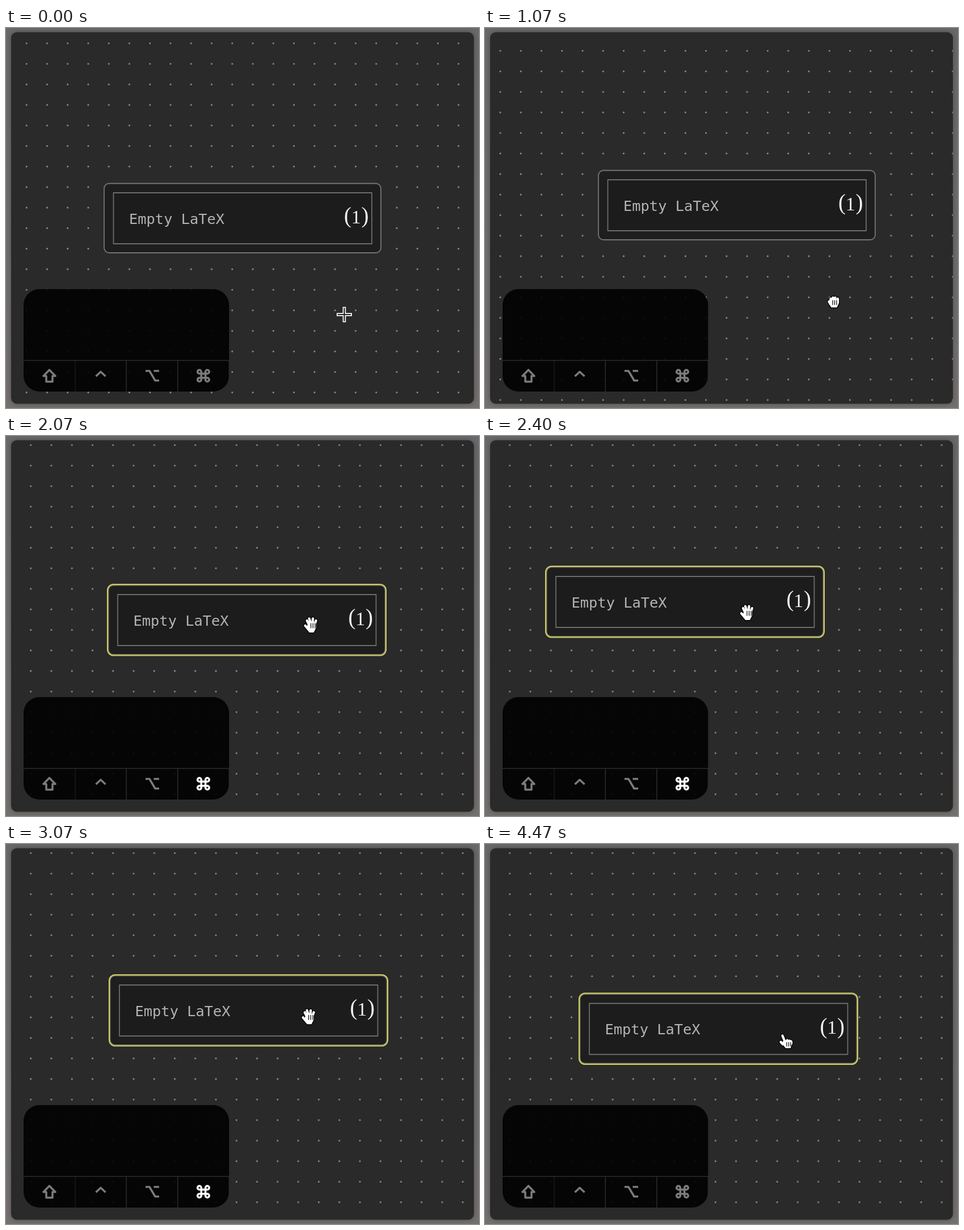
Write an HTML page with a canvas that moves like this. It is 834 px wide and 671 px high and loops after 4.54 s.

```html
<!DOCTYPE html>
<html lang="en">
<head>
<meta charset="utf-8">
<title>Canvas pan and drag</title>
<style>
  html, body { margin: 0; width: 100%; height: 100%; overflow: hidden; background: #6c6b6d; }
  canvas { display: block; }
</style>
</head>
<body>
<canvas id="stage" width="834" height="671"></canvas>
<script>
const ctx = document.getElementById('stage').getContext('2d');
const LOOP = 4540, TICK = 1000 / 15, GRID = 36.27;
const PAN_START = 1, PAN_END = 24, DRAG_START = 31, RELEASE = 53;

// Offsets per tick: circling the view, then circling the node.
const panPath = [
  [0, 0], [4, 6], [31, 3], [42, -22], [10, -48], [-28, -40], [-40, -8], [-6, 8],
  [33, -9], [68, -22], [20, -54], [-30, -46], [-46, -14], [-18, 10], [18, 2], [27, -23],
  [-8, -26], [-34, -36], [-42, -8], [-8, 10], [27, 0], [27, -18], [8, -16], [7.5, -11]
];
const dragPath = [
  [0, 0], [2, 3], [38, 4], [20, -38], [-30, -53], [-72, -32], [-82, 5], [-45, 38],
  [8, 40], [41, -2], [-27, -43.5], [-73, -38], [-68, 28], [-15, 55], [35, 28], [3, -31],
  [-18, -20], [-18, 4], [-14, 5], [-13, 1.5]
];

const clamp = (v, lo, hi) => Math.min(hi, Math.max(lo, v));
const mix = (a, b, f) => [a[0] + (b[0] - a[0]) * f, a[1] + (b[1] - a[1]) * f];
const add = (a, b) => [a[0] + b[0], a[1] + b[1]];

function along(path, step) {
  const s = clamp(step, 0, path.length - 1), i = Math.floor(s);
  return mix(path[i], path[Math.min(i + 1, path.length - 1)], s - i);
}

const icons = {
  shift: 'M76.5 603.7L87 614.5H82V624.5H71V614.5H66Z',
  control: 'M158.5 615L167 607L175.5 615',
  option: 'M246 605.5H253L263 622.5H270M260.5 605.5H270',
  command: 'M344.3 607a3.3 3.3 0 1 0 -3.3 3.3H355a3.3 3.3 0 1 0 -3.3 -3.3V621' +
    'a3.3 3.3 0 1 0 3.3 -3.3H341a3.3 3.3 0 1 0 3.3 3.3Z'
};

const hands = {
  open: {
    limbs: 'M-3 0L-7 -8M0 -2L-3 -11.5M3 -2L3.5 -11.5M6 0L9 -8M-4 8L-10 1',
    palm: 'M-6 -1H9V5L5 13H-3L-8 6Z',
    marks: 'M0 -3V5M3.7 -3V5M7.4 -3V5'
  },
  fist: {
    limbs: 'M-5 -5V2M-1 -7V2M3 -7V2M7.5 -5V2M-8 0L-5 5',
    palm: 'M-7 -3H9V4L6 10.5H-4L-8 4Z',
    marks: 'M-1.5 -2V5.5M2 -2V5.5M5.5 -2V5.5'
  },
  point: {
    limbs: 'M.5 4L5 15M9 12V17M13 13V17M16 14.5V18M-2.5 15L1 19',
    palm: 'M3 12H17V19L15 26H6L-1 17Z',
    marks: 'M8 16V22.5M11.5 16V22.5M15 16V22.5'
  }
};

function strokePath(d, color, width) {
  ctx.strokeStyle = color;
  ctx.lineWidth = width;
  ctx.stroke(new Path2D(d));
}

function roundBox(x, y, w, h, r, fill, stroke, width = 1.8) {
  ctx.beginPath();
  ctx.roundRect(x, y, w, h, r);
  if (fill) { ctx.fillStyle = fill; ctx.fill(); }
  if (stroke) { ctx.strokeStyle = stroke; ctx.lineWidth = width; ctx.stroke(); }
}

function label(text, x, y, font, color) {
  ctx.font = font;
  ctx.fillStyle = color;
  ctx.fillText(text, x, y);
}

function drawBackdrop() {
  const g = ctx.createLinearGradient(0, 0, 0, 671);
  g.addColorStop(0, '#69686b');
  g.addColorStop(1, '#73706e');
  ctx.fillStyle = g;
  ctx.fillRect(0, 0, 834, 671);
  ctx.save();
  ctx.shadowColor = 'rgba(0,0,0,.3)';
  ctx.shadowBlur = 8;
  roundBox(9, 7.5, 816, 656, 10, '#2a2a2a');
  ctx.restore();
}

function drawDots([dx, dy]) {
  const first = v => ((v % GRID) + GRID) % GRID;
  ctx.save();
  ctx.beginPath();
  ctx.roundRect(9, 7.5, 816, 656, 10);
  ctx.clip();
  ctx.fillStyle = '#868686';
  ctx.beginPath();
  for (let x = first(36.2 + dx); x < 830; x += GRID) {
    for (let y = first(27 + dy); y < 670; y += GRID) {
      ctx.moveTo(x + 1.6, y);
      ctx.arc(x, y, 1.6, 0, Math.PI * 2);
    }
  }
  ctx.fill();
  ctx.restore();
}

function drawNode([dx, dy], selected) {
  ctx.save();
  ctx.translate(dx, dy);
  roundBox(173, 274.5, 488, 122.5, 9, '#1e1e1e', '#747474');
  if (selected) roundBox(171.5, 273, 491, 125.5, 10.5, null, '#d2cf60', 2.1);
  roundBox(189.5, 291, 455.5, 90, 0, '#1c1c1c', '#6c6c6c');
  label('Empty LaTeX', 217, 345.5, '25.4px "DejaVu Sans Mono", monospace', '#b4b4b4');
  const serif = 'px "Liberation Serif", serif', ink = '#f2f2f2';
  label('(', 596, 344.4, 39 + serif, ink);
  label('1', 608.7, 344.5, 34 + serif, ink);
  label(')', 626.5, 344.4, 39 + serif, ink);
  ctx.restore();
}

function drawKeys(commandDown) {
  ctx.save();
  ctx.beginPath();
  ctx.roundRect(31, 461, 362.3, 181, 28);
  ctx.clip();
  ctx.fillStyle = 'rgba(0,0,0,.89)';
  ctx.fillRect(31, 461, 363, 125.2);
  for (let i = 0; i < 4; i++) ctx.fillRect(31 + i * 90.6 + (i ? .8 : 0), 587.8, i ? 89.1 : 90.6, 55);
  ctx.restore();
  ctx.lineCap = 'butt';
  for (const name in icons) {
    strokePath(icons[name], name === 'command' && commandDown ? '#fff' : '#7c7c7c', 3.5);
  }
}

function drawCross() {
  const arms = 'M0 -13.5V13.5M-13.5 0H13.5', core = 'M0 -11.7V11.7M-11.7 0H11.7';
  ctx.lineCap = 'butt';
  strokePath(arms, '#fff', 5.6);
  strokePath(core, '#222', 2.2);
}

function drawHand({ limbs, palm, marks }) {
  ctx.lineCap = 'round';
  strokePath(limbs, '#000', 6.6);
  strokePath(palm, '#000', 3);
  strokePath(limbs, '#fff', 4.3);
  ctx.fillStyle = '#fff';
  ctx.fill(new Path2D(palm));
  strokePath(marks, '#111', 1.3);
}

// The pointer runs slightly ahead of whatever it moves.
function pointerAt(tick) {
  const lead = .3, rest = [591, 494], hover = [537, 333];
  if (tick < PAN_START) return [596.5, 506];
  if (tick < PAN_END) {
    const settle = clamp((tick - 20) / 4, 0, 1);
    return add(mix([598, 507], [583.5, 505], settle), along(panPath, tick - PAN_START + lead));
  }
  if (tick < DRAG_START) {
    const f = clamp((tick - PAN_END) / 4, 0, 1);
    return mix(rest, hover, f * f * (3 - 2 * f));
  }
  return add(hover, along(dragPath, tick - DRAG_START + lead));
}

function pointerShape(tick) {
  if (tick < PAN_START) return 'cross';
  if (tick <= PAN_END) return 'fist';
  if (tick < 27) return 'cross';
  return tick < RELEASE ? 'open' : 'point';
}

function render() {
  const time = (performance.now() - start) % LOOP;
  const tick = Math.floor((time + 3.5) / TICK);
  const pan = along(panPath, tick - PAN_START);
  const drag = along(dragPath, tick - DRAG_START);
  const shape = pointerShape(tick);

  drawBackdrop();
  drawDots(pan);
  drawNode(add(pan, drag), tick >= DRAG_START);
  drawKeys(tick >= 27 && tick < RELEASE);
  ctx.save();
  ctx.translate(...pointerAt(tick));
  if (shape === 'cross') drawCross();
  else drawHand(hands[shape]);
  ctx.restore();
  requestAnimationFrame(render);
}

ctx.lineJoin = 'round';
const start = performance.now();
render();
</script>
</body>
</html>
```
